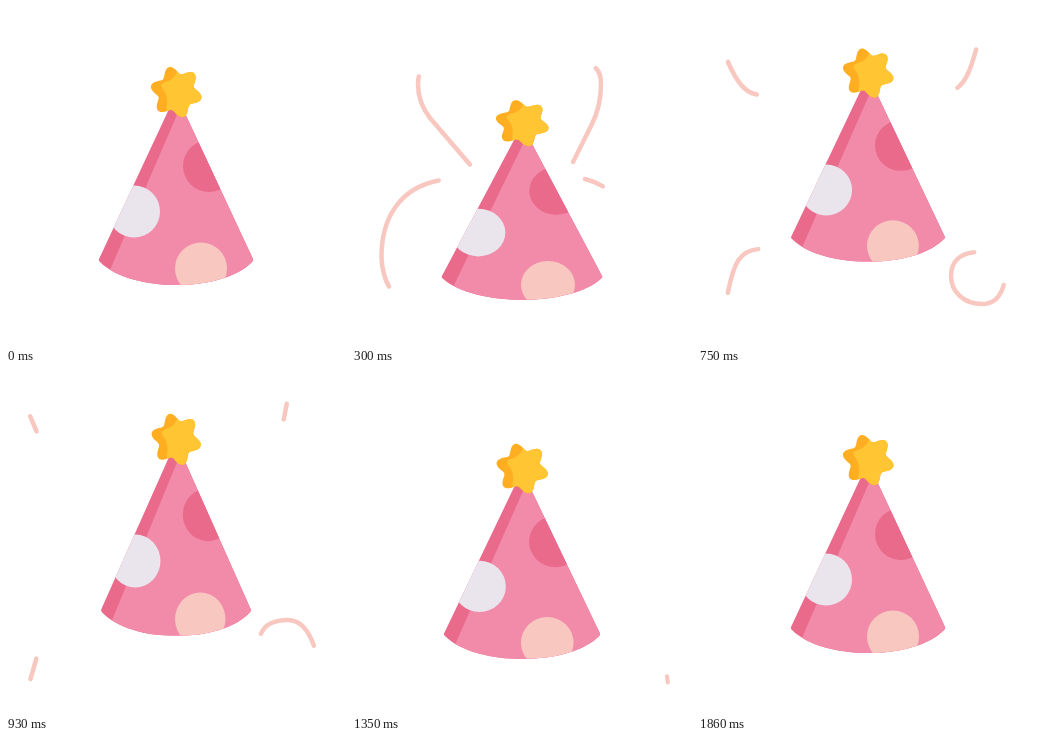
Write an HTML page that moves like this. It is 340 by 340 pixels and loops after 1890 ms.

```html
<!DOCTYPE html>
<html lang="en">
<head>
<meta charset="utf-8">
<title>Party hat</title>
<style>
  html, body { margin: 0; width: 100%; height: 100%; overflow: hidden; background: #fff; }
  svg { display: block; width: 100vw; height: 100vh; }
  #streamers { fill: none; stroke: #f8c8c0; stroke-linecap: round; stroke-linejoin: round; }
</style>
</head>
<body>
<svg viewBox="0 0 340 340">
  <defs>
    <clipPath id="cone">
      <path d="M170 88L93 253Q92.400 254.500 93.500 255.500C109 271.500 140 279 170 279C202 279 232 271 246.500 255.500Q247.600 254.500 247 253Z"/>
    </clipPath>
    <clipPath id="front">
      <path d="M172 58L170.500 67Q168 74 158 76.500Q153.500 78.500 156.500 82.500Q163 90 160.500 102Q160 106 166 108L200 118V58Z"/>
    </clipPath>
  </defs>
  <g id="streamers">
    <path pathLength="1" d="M150 196L78 112C70 102 66 92 66 78C66 66 71 60 80 60C88 60 94 66 94 75C94 84 88 91 78 91C70 91 64 90 57 88C45 86 36 70 30 56L22.500 38.500"/>
    <path pathLength="1" d="M200 198L240 118C246 106 249 92 249 78C249 66 244 59 235 59C227 59 221 66 221 75C221 84 227 90 236 90C245 90 252 86 259 82C268 76 273 62 278 44L281.500 26"/>
    <path pathLength="1" d="M150 172C130 171 112 171 99 173C52 176 29 208 29.500 252C31 278 42 293 57 293C74 293 87 278 87 261C87 249 80 243 62 243C42 244 36 256 30 286L23 310"/>
    <path pathLength="1" d="M233 173C262 180 280 207 290 222C304 245 312 264 304 284C300 294 292 298 284 298C266 298 253 286 253 270C253 254 264 246 282 246C300 246 311 268 316 310"/>
  </g>
  <g id="hat">
    <g clip-path="url(#cone)">
      <rect x="80" y="80" width="180" height="205" fill="#ea6a8c"/>
      <path d="M180 88L97.500 279H260V88Z" fill="#f28aaa"/>
      <circle cx="203" cy="160" r="26" fill="#ea6a8c"/>
      <circle cx="128" cy="205.500" r="26" fill="#eae5ed"/>
      <circle cx="195" cy="262.500" r="26" fill="#f8c8c0"/>
    </g>
    <polygon class="star" fill="#ffae22"/>
    <polygon class="star" fill="#ffc533" clip-path="url(#front)"/>
  </g>
</svg>
<script>
const LOOP = 1890, STEP = 30, LINE = 4.5;
const hat = document.getElementById('hat');
const streamers = [...document.querySelectorAll('#streamers path')];

const clamp = u => Math.min(1, Math.max(0, u));
const easeOut = u => 1 - (1 - clamp(u)) ** 3;
const swing = u => (1 - Math.cos(Math.PI * clamp(u))) / 2;

// Swings from one [time, value] key to the next.
const follow = (keys, t) => keys.slice(1).reduce((v, [end, to], i) => {
  const [begin, from] = keys[i];
  return v + (to - from) * swing((t - begin) / (end - begin));
}, keys[0][1]);

const height = [[0, 279], [270, 294.3], [730, 255.8], [1400, 285.3], [1860, 279]];
const scaleX = [[0, 1], [395, 1.046], [1000, 0.968], [1400, 1.013], [1860, 1]];
const scaleY = [[0, 1], [395, 0.903], [1000, 1.022], [1400, 0.985], [1860, 1]];

// Each line's head and tail run along the path; the line thins out before `gone`.
const early = {
  head: t => easeOut((t - 60) / 1140),
  tail: t => easeOut(t / 1300) ** 3,
  gone: 1400
};
const late = {
  head: t => easeOut((t - 275) / 1280),
  tail: t => easeOut((t - 395) / 1230) ** 2,
  gone: 1720
};

// Six rounded points as a wave around a circle.
const star = Array.from({ length: 120 }, (_, i) => {
  const a = i * Math.PI / 60;
  const r = 22.2 + 3.8 * Math.cos(6 * (a - 14 * Math.PI / 180));
  return [170.2 + r * Math.cos(a), 86.1 + r * Math.sin(a)];
}).join(' ');
document.querySelectorAll('.star').forEach(el => el.setAttribute('points', star));

function drawStreamer(el, { head, tail, gone }, t) {
  const from = tail(t), length = head(t) - from;
  const width = Math.min(LINE, (gone - t) / 90);
  el.style.visibility = length > 0 && width > 0 ? 'visible' : 'hidden';
  el.setAttribute('stroke-width', Math.max(0, width));
  el.setAttribute('stroke-dasharray', `${Math.max(0, length)} 2`);
  el.setAttribute('stroke-dashoffset', -from);
}

function draw(t) {
  hat.setAttribute('transform', `translate(170 ${follow(height, t)})
    scale(${follow(scaleX, t)} ${follow(scaleY, t)}) translate(-170 -279)`);
  streamers.forEach((el, i) => drawStreamer(el, i < 3 ? early : late, t));
}

const start = performance.now();
function tick() {
  const t = (performance.now() - start) % LOOP;
  draw(Math.floor(t / STEP) * STEP);
  requestAnimationFrame(tick);
}
tick();
</script>
</body>
</html>
```
